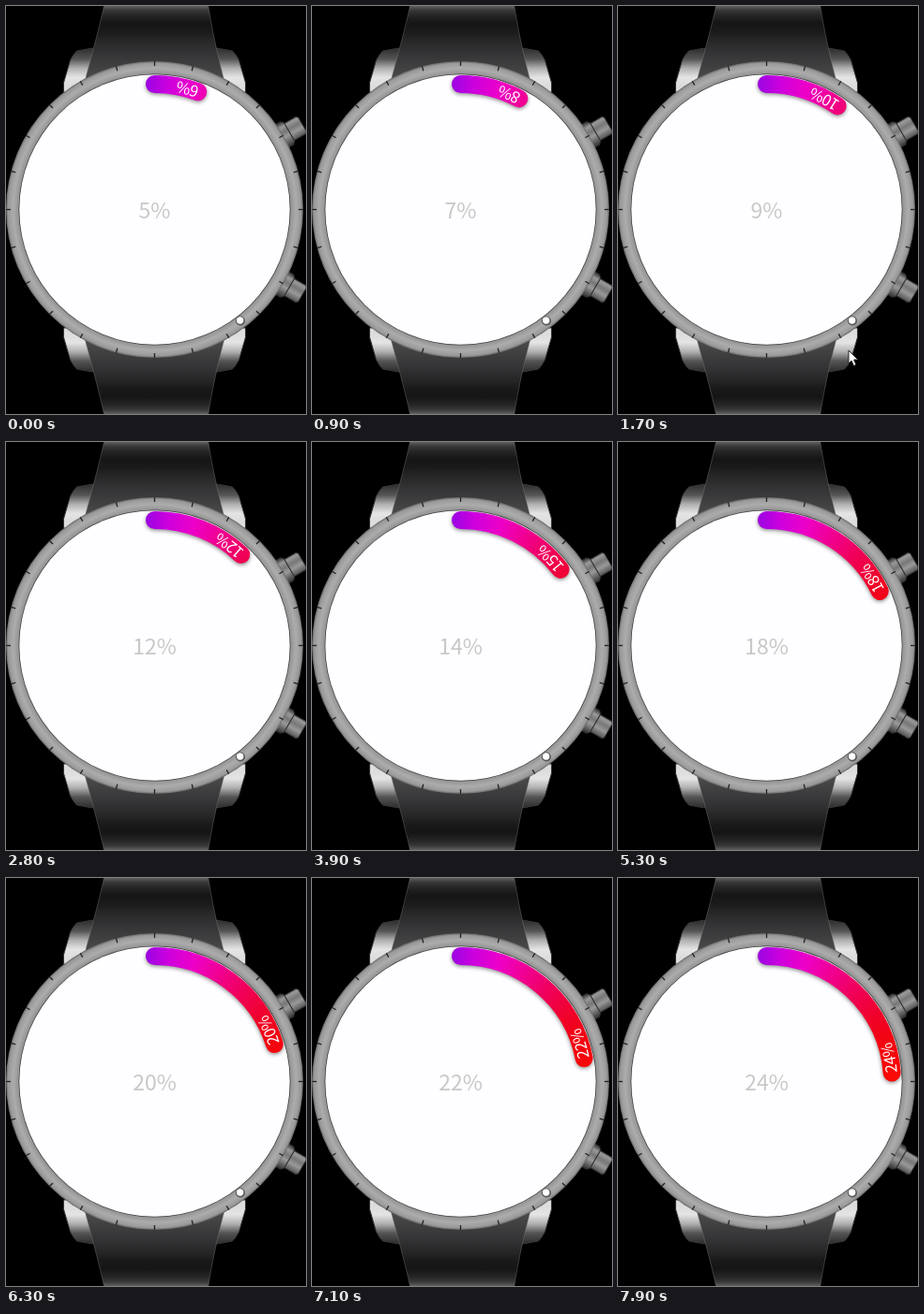
Recreate the animation shown at these times as an HTML page with a canvas. Size 320 px wide and 436 px high, loop 8 s.

```html
<!DOCTYPE html>
<html>
<head>
<meta charset="utf-8">
<style>
html, body { margin: 0; width: 100%; height: 100%; overflow: hidden; background: #000; }
canvas { display: block; }
</style>
</head>
<body>
<canvas id="stage" width="320" height="436"></canvas>
<script>
const ctx = document.getElementById('stage').getContext('2d');
const CX = 158.5, CY = 217.5, TAU = Math.PI * 2, DEG = Math.PI / 180;
const LOOP = 8000, STEP = 100;
const ARC_R = 134, LABEL_R = 139.5;
const FONT = '"Noto Sans CJK JP", "Noto Sans CJK SC", "Noto Sans CJK", "Noto Sans", sans-serif';

function withStops(gradient, stops) {
  stops.forEach(([at, color]) => gradient.addColorStop(at, color));
  return gradient;
}

function linear(x0, y0, x1, y1, stops) {
  return withStops(ctx.createLinearGradient(x0, y0, x1, y1), stops);
}

function shape(path, fill, stroke) {
  const p = new Path2D(path);
  ctx.fillStyle = fill;
  ctx.fill(p);
  if (stroke) {
    ctx.strokeStyle = stroke;
    ctx.lineWidth = 1;
    ctx.stroke(p);
  }
}

function disc(x, y, r, fill) {
  ctx.beginPath();
  ctx.arc(x, y, r, 0, TAU);
  ctx.fillStyle = fill;
  ctx.fill();
}

// One strap half with its two lugs; flipped vertically for the lower half.
function strap(flip) {
  ctx.save();
  if (flip) {
    ctx.translate(0, 436);
    ctx.scale(1, -1);
  }
  for (const side of [1, -1]) {
    ctx.save();
    ctx.translate(CX, 0);
    ctx.scale(side, 1);
    shape('M-66 45 L-83 48 Q-87 52 -90 58 L-97 82 V92 H-60Z',
      linear(0, 45, 0, 84, [[0, '#2c2c2c'], [.3, '#555'], [.55, '#b0b0b0'], [.8, '#e4e4e4'], [1, '#ddd']]), '#383838');
    ctx.restore();
  }
  shape('M105 -2 H215.5 C219 22 225 50 235 88 H82 C92 50 100 22 105 -2Z',
    linear(0, 0, 0, 75, [[0, '#606060'], [.06, '#383838'], [.13, '#262627'], [.24, '#151516'],
      [.37, '#1a1a1b'], [.47, '#252526'], [.67, '#343436'], [1, '#484849']]), 'rgba(130,130,130,.4)');
  ctx.restore();
}

function crown(angle) {
  const metal = linear(0, -14, 0, 14, [[0, '#333'], [.2, '#999'], [.4, '#777'], [.6, '#999'], [.8, '#666'], [1, '#333']]);
  ctx.save();
  ctx.translate(CX, CY);
  ctx.rotate(angle * DEG);
  shape('M150 -14 H163 L166 -11 V11 L163 14 H150Z', metal, '#333');
  shape('M166 -10.5 H180 L182 -8.5 V8.5 L180 10.5 H166Z', metal, '#333');
  ctx.restore();
}

function bezel() {
  disc(CX, CY, 158.5, withStops(ctx.createRadialGradient(CX, CY, 143, CX, CY, 158.5),
    [[0, '#858585'], [.15, '#959595'], [.5, '#acacac'], [.85, '#9a9a9a'], [1, '#666']]));
  ctx.strokeStyle = '#222';
  ctx.lineWidth = 1.3;
  for (let i = 0; i < 24; i++) {
    const c = Math.cos(i * TAU / 24), s = Math.sin(i * TAU / 24);
    ctx.beginPath();
    ctx.moveTo(CX + 153.5 * c, CY + 153.5 * s);
    ctx.lineTo(CX + 158.5 * c, CY + 158.5 * s);
    ctx.stroke();
  }
  disc(CX, CY, 145, '#444');
  disc(CX, CY, 144.2, '#fefdff');
  disc(250, 336.5, 5, '#555');
  disc(249.7, 336, 3.7, '#fff');
}

function progress(tip) {
  ctx.save();
  // The sweep starts 10 degrees early to cover the round cap.
  ctx.strokeStyle = withStops(ctx.createConicGradient(-100 * DEG, CX, CY), [
    [0, '#9000e0'], [8 / 360, '#a404e2'], [16 / 360, '#cc00de'], [28 / 360, '#ec00c8'],
    [40 / 360, '#f00094'], [54 / 360, '#f0005a'], [68 / 360, '#f0022c'],
    [80 / 360, '#f20412'], [100 / 360, '#fa0a04'], [.5, '#fa0a04']]);
  ctx.lineWidth = 19;
  ctx.lineCap = 'round';
  ctx.shadowColor = 'rgba(0,0,0,.45)';
  ctx.shadowBlur = 4;
  ctx.shadowOffsetY = 1.5;
  ctx.beginPath();
  ctx.arc(CX, CY, ARC_R, -90 * DEG, (tip - 90) * DEG);
  ctx.stroke();
  ctx.restore();
}

// Text runs backwards from the tip, with glyph tops facing the centre.
function curvedLabel(text, tip) {
  ctx.font = '16.5px ' + FONT;
  ctx.fillStyle = '#fff';
  ctx.textAlign = 'center';
  let along = 0;
  for (const ch of text) {
    const w = ctx.measureText(ch).width;
    ctx.save();
    ctx.translate(CX, CY);
    ctx.rotate(tip * DEG - (along + w / 2) / LABEL_R);
    ctx.translate(0, -LABEL_R);
    ctx.rotate(Math.PI);
    ctx.fillText(ch, 0, 0);
    ctx.restore();
    along += w;
  }
}

function pointer(t) {
  const spots = [[226, 417], [246, 368], [302, 345], [314, 338]];
  const spot = spots[(t - 1600) / STEP];
  if (!spot) return;
  ctx.save();
  ctx.translate(...spot);
  shape('M0 0 V14 L3 11 L5.5 16.5 L8 15.4 L5.6 10 H10Z', '#fff', '#222');
  ctx.restore();
}

function draw(now) {
  const t = Math.floor(now % LOOP / STEP) * STEP;
  const value = 5.9 + 2.31 * t / 1000;
  const tip = 3.6 * value - 1;

  ctx.fillStyle = '#000';
  ctx.fillRect(0, 0, 320, 436);
  strap(false);
  strap(true);
  crown(-30);
  crown(30);
  bezel();
  progress(tip);
  curvedLabel(Math.round(value) + '%', tip);

  ctx.font = '23px ' + FONT;
  ctx.fillStyle = '#c8c8c8';
  ctx.textAlign = 'center';
  ctx.fillText(Math.floor(value) + '%', 158.5, 227);
  pointer(t);
}

const start = performance.now();
function tick() {
  draw(performance.now() - start);
  requestAnimationFrame(tick);
}
tick();
</script>
</body>
</html>
```
